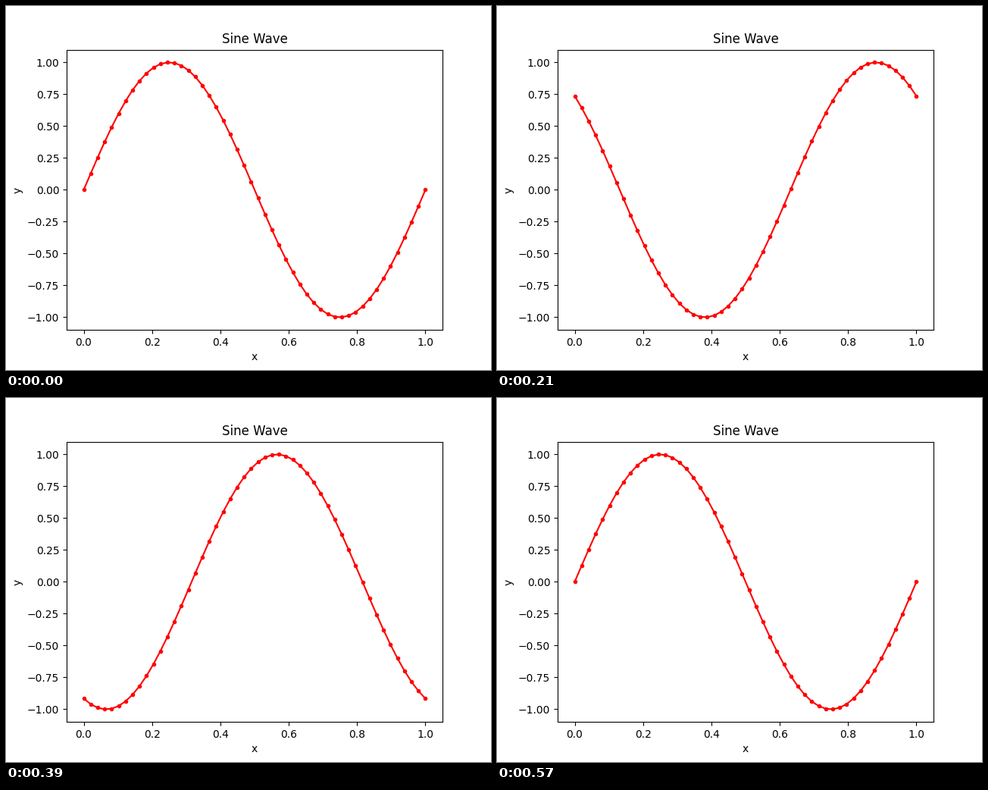
A matplotlib script that plays this animation: 640 by 480 pixels, repeating every 600 ms.

```python
import numpy as np
import matplotlib.pyplot as plt
from matplotlib.animation import FuncAnimation

FRAMES = 20
INTERVAL = 30  # ms

x = np.linspace(0, 1, 50)
phases = np.linspace(0, 2 * np.pi, FRAMES)


def wave(phase):
    return np.sin(2 * np.pi * x + phase)


fig, ax = plt.subplots(figsize=(6.4, 4.8), dpi=100)
line, = ax.plot(x, wave(0), "r.-")
ax.set_title("Sine Wave")
ax.set_xlabel("x")
ax.set_ylabel("y")


def update(i):
    line.set_ydata(wave(phases[i]))
    return line,


anim = FuncAnimation(fig, update, frames=FRAMES, interval=INTERVAL,
                     repeat=True, repeat_delay=0)
plt.show()
```
